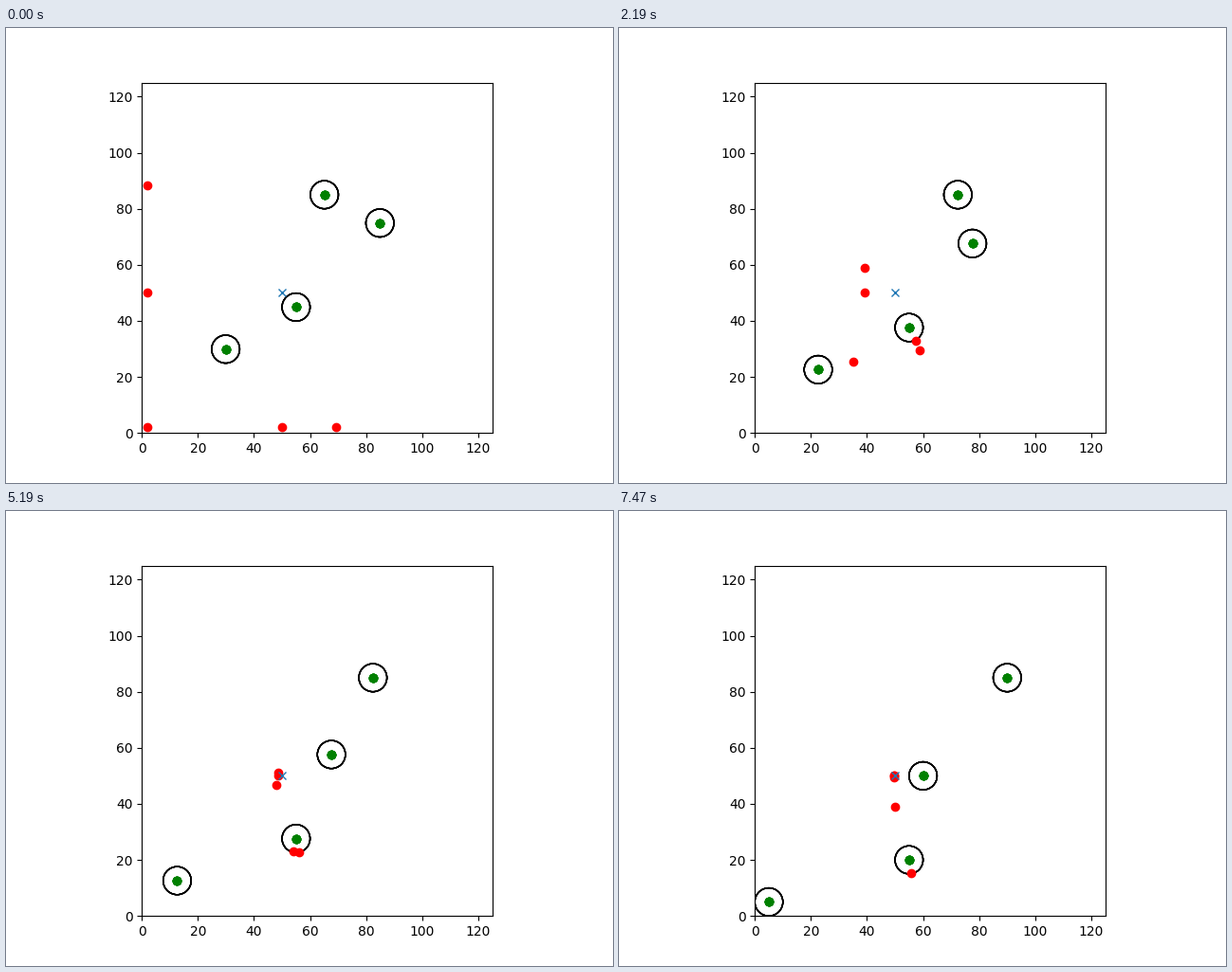
These frames come from a looping animation (640 by 480 pixels, 7.5 s). A matplotlib script:

```python
import numpy as np
import matplotlib.pyplot as plt
from matplotlib.animation import FuncAnimation

FRAMES, INTERVAL = 250, 30
GOAL = np.array([50.0, 50.0])
DECAY, SPEED = 0.98, 0.1
LAYERS = 5  # every robot draws its own copy of the obstacles

OBSTACLES = np.array([(30, 30), (55, 45), (65, 85), (85, 75)])
HEADINGS = np.array([(-1, -1), (0, -1), (1, 0), (-1, -1)])

# start, obstacle met, orbit keys: time, degrees off the goal line, distance
ROBOTS = [
    ((0, 0), 0, [(28, 0, 6.2), (46, 76, 6.6), (58, 83, 9.4)]),
    ((50, 0), 1, [(60, -82, 5.9), (73, 3, 8.8), (142, -2, 4.7),
                  (205, -45, 4.8), (212, -133, 6.2)]),
    ((70, 0), 1, [(55, -11, 5.4), (70, 3, 5.4), (249, 0, 4.85)]),
    ((0, 50), None, None),
    ((0, 90), None, None),
]


def obstacles_at(n):
    return OBSTACLES + HEADINGS * SPEED * (n + 1)


def attract(pos, steps):
    """Close in on the goal by a fixed share per step."""
    return GOAL + (np.array(pos) - GOAL) * DECAY ** steps


def orbit(obstacle, keys, n):
    """Circle an obstacle, measured from the side facing away from the goal."""
    t, turn, dist = np.transpose(keys)
    center = obstacles_at(n)[obstacle]
    dx, dy = center - GOAL
    angle = np.arctan2(dy, dx) + np.radians(np.interp(n, t, turn))
    return center + np.interp(n, t, dist) * np.array([np.cos(angle), np.sin(angle)])


def robot_at(start, obstacle, keys, n):
    if not keys or n < keys[0][0]:
        return attract(start, n + 2)
    leave = keys[-1][0]
    return attract(orbit(obstacle, keys, min(n, leave)), max(n - leave, 0))


fig, ax = plt.subplots(figsize=(6.4, 4.8), dpi=100)
ax.set_aspect("equal")
ax.set(xlim=(0, 125), ylim=(0, 125))

rings = [[ax.add_patch(plt.Circle(c, 5, fill=False)) for c in OBSTACLES]
         for _ in range(LAYERS)]
cores = [ax.plot([], [], "go")[0] for _ in range(LAYERS)]
robots, = ax.plot([], [], "ro")
ax.plot(*GOAL, "x", color="C0")


def update(n):
    centers = obstacles_at(n)
    for layer, core in zip(rings, cores):
        core.set_data(*centers.T)
        for ring, c in zip(layer, centers):
            ring.center = c
    robots.set_data(*np.transpose([robot_at(*r, n) for r in ROBOTS]))
    return [robots, *cores]


anim = FuncAnimation(fig, update, frames=FRAMES, interval=INTERVAL,
                     repeat=True, repeat_delay=0, blit=False)
plt.show()
```
